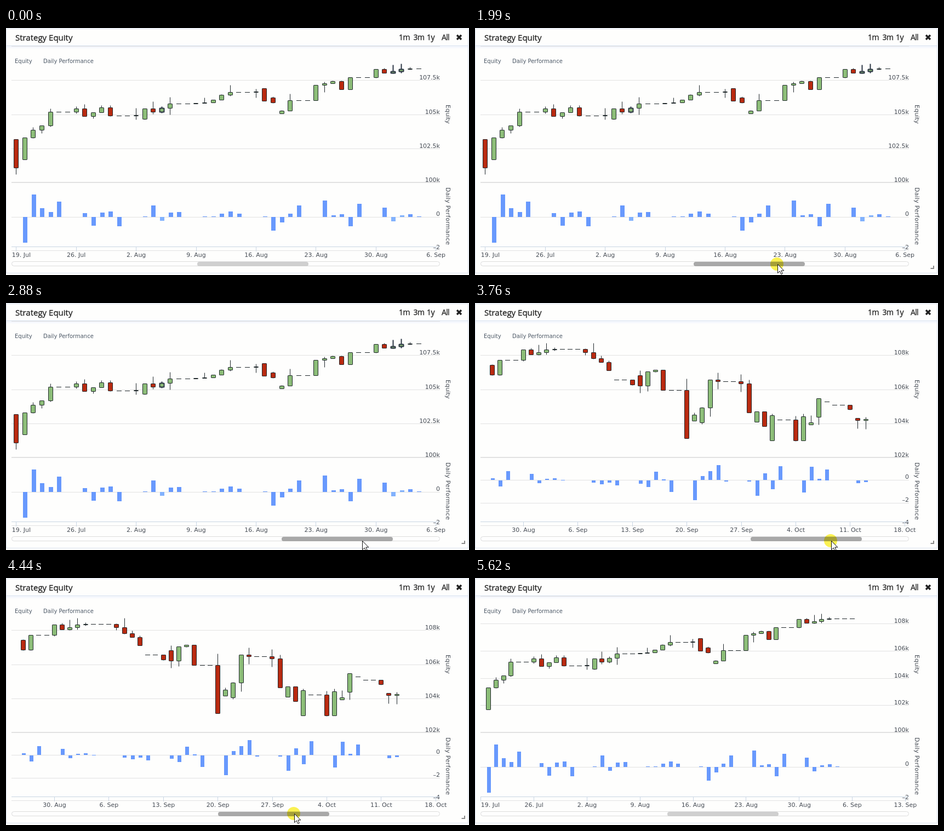
Animation of 845 by 451 pixels, one loop 6160 ms. Source, as an HTML page:

```html
<!DOCTYPE html>
<html lang="en">
<head>
<meta charset="utf-8">
<title>Strategy Equity</title>
<style>
  html, body { margin: 0; width: 100%; height: 100%; overflow: hidden; background: #fefefd; }
  svg { display: block; width: 845px; height: 451px; }
  text { font-family: "DejaVu Sans", sans-serif; font-size: 11px; fill: #454b54; }
  .head { font-family: "Open Sans", sans-serif; font-size: 15px; fill: #222; stroke: #222; stroke-width: .3; }
  .btn { font-size: 14px; text-anchor: middle; letter-spacing: -.6px; }
  .key { font-size: 10px; fill: #4c5866; }
  .end { text-anchor: end; }
  .mid { text-anchor: middle; }
  .grid { stroke: #e2e2e2; }
  .axis { stroke: #c9d6e4; }
  .ink { stroke: #20282c; }
  .bold { stroke: #2c3644; stroke-width: 2; }
</style>
</head>
<body>
<svg id="stage" viewBox="0 0 845 451"></svg>
<script>
const LOOP = 6160;
const stage = document.getElementById('stage');

function el(tag, attrs, parent = stage, text) {
  const node = document.createElementNS('http://www.w3.org/2000/svg', tag);
  for (const k in attrs) node.setAttribute(k, attrs[k]);
  if (text !== undefined) node.textContent = text;
  parent.appendChild(node);
  return node;
}
const line = (x1, y1, x2, y2, cls, parent) => el('line', { x1, y1, x2, y2, class: cls }, parent);
const label = (x, y, text, cls, parent) => el('text', { x, y, class: cls }, parent, text);
const snap = v => Math.round(v) + .5;

let seed = 7;
const random = () => (seed = seed * 16807 % 2147483647) / 2147483647;

// Weekday closes above 100k, in tens, and the days that open with a jump.
const START = 318;
const closes = [
  109, 330, 386, 418, 519, 543, 487, 515, 551, 491, 495, 543, 519, 547, 579,
  583, 587, 607, 643, 663, 667, 599, 587, 527, 603, 716, 728, 744, 684, 772,
  832, 804, 816, 832, 836, 836, 817, 781, 759, 711, 627, 621, 704, 714, 595,
  312, 451, 492, 656, 646, 634, 463, 470, 383, 447, 300, 441, 406, 547, 528,
  483, 418, 425];
const jumps = { 1: 60, 15: -28, 29: 24, 30: 24, 31: -80, 54: -55, 57: 55, 64: 103, 65: -45,
  72: -55, 74: -83, 75: -25, 79: -48, 80: 32, 81: -19, 82: -20, 85: -51 };

// Each day opens at the last close; weekends stay flat; daily results follow one day later.
const candles = [], results = [];
let last = START;
for (let day = 0, n = 0; n < closes.length; day++) {
  const open = last + (jumps[day] || 0);
  const close = day % 7 < 5 ? closes[n++] : open;
  const wick = () => close === open ? 0 : 70 * random() ** 4;
  candles[day] = [open, close, Math.max(open, close) + wick(), Math.min(open, close) - wick()]
    .map(v => 100 + v / 100);
  results[day + 1] = 2 * Math.tanh((close - open) / (10000 + open) * 50);
  last = close;
}

function dateText(day) {
  const d = new Date(Date.UTC(2010, 6, 19 + day));
  return d.getUTCDate() + '. ' + ['Jul', 'Aug', 'Sep', 'Oct'][d.getUTCMonth() - 6];
}

const views = [
  { x0: 18.8, step: 15.63, from: 0, to: 47, mondays: [0, 49], base: 100, gap: 2.5, scale: 24.87,
    zero: 345, unit: 30.75, bar: 8, bold: [17, 44, 45] },
  { x0: -507.9, step: 14.2, from: 38, to: 86, mondays: [42, 91], base: 102, gap: 2, scale: 31.12,
    zero: 323.5, unit: 20.75, bar: 7, bold: [] },
  { x0: 10.8, step: 13.83, from: 1, to: 49, mondays: [0, 56], base: 100, gap: 2, scale: 24.87,
    zero: 345, unit: 30.75, bar: 7, bold: [] }
];

function drawCandle(g, x, [o, c, h, l], cls) {
  const left = Math.floor(x - 4.2) + .5, mid = left + 4;
  const top = Math.min(o, c), bottom = Math.max(o, c);
  if (h < top) line(mid, h, mid, top, cls, g);
  if (l > bottom) line(mid, bottom, mid, l, cls, g);
  if (o === c) return line(left - .5, o, left + 8.5, o, 'ink', g);
  el('rect', { x: left, y: top, width: 8, height: bottom - top, rx: .6,
    class: cls, fill: c > o ? '#b92a10' : '#8cbd78' }, g);
}

function drawView(v) {
  const g = el('g', {});
  const X = d => v.x0 + d * v.step;
  const Y = k => snap(282 - (k - v.base) * v.scale);
  if (v.base === 100) line(10, 33.5, 792, 33.5, 'grid', g);
  el('rect', { x: 10, y: 281, width: 782, height: 2, fill: '#e2e2e2' }, g);
  for (let k = v.base; k <= 108; k += v.gap) {
    if (k > v.base) line(10, Y(k), 792, Y(k), 'grid', g);
    label(792, Y(k) - 1.5, k + 'k', 'end', g);
  }
  for (let p = 0; v.zero + p * v.unit < 410; p += 2) {
    const y = Math.floor(v.zero + p * v.unit) + .5;
    line(10, y, 792, y, 'grid', g);
    label(792, y - 2.5, p ? '–' + p : 0, 'end', g);
  }
  line(10, 399.5, 792, 399.5, 'axis', g);
  for (let d = v.mondays[0]; d <= v.mondays[1]; d += 7) {
    const x = snap(X(d) - .5);
    line(x, 400, x, 408, 'axis', g);
    label(Math.max(X(d), 28), 418, dateText(d), 'mid', g);
  }
  for (let d = v.from; d <= v.to; d++) {
    const x = X(d), lit = v.bold.includes(d);
    if (results[d]) {
      const h = results[d] * v.unit;
      el('rect', { x: Math.floor(x - v.bar / 2 + 1), y: Math.round(v.zero - Math.max(h, 0)), width: v.bar,
        height: Math.max(1, Math.round(Math.abs(h))), fill: lit ? '#82b2fd' : '#6899fd' }, g);
    }
    drawCandle(g, x, candles[d].map(Y), lit ? 'bold' : 'ink');
  }
  return g;
}

// Panel
el('rect', { x: .5, y: 1.5, width: 843, height: 446, fill: '#fefefd', stroke: '#d9e1ee' });
el('rect', { x: 1, y: 32, width: 842, height: 1, fill: '#d5dfef' });
el('rect', { x: 1, y: 33, width: 842, height: 4, fill: '#f6f8fd' });
label(17, 23, 'Strategy Equity', 'head');
[[727, '1m'], [753.5, '3m'], [775, '1y'], [802, 'All']]
  .forEach(([x, s]) => label(x, 22, s, 'head btn'));
el('path', { d: 'M823 13L831 21M831 13L823 21', stroke: '#222', 'stroke-width': 3.4 });
label(16, 64, 'Equity', 'key');
label(68, 64, 'Daily Performance', 'key');

const charts = views.map(drawView);
const sideText = (y, text, spacing) => el('text',
  { transform: `translate(803 ${y}) rotate(90)`, 'letter-spacing': spacing }, stage, text);
sideText(140, 'Equity', 0);
sideText(291, 'Daily Performance', .25);

el('rect', { x: 10.5, y: 426.5, width: 781, height: 8, rx: 4, fill: '#fefefe', stroke: '#dcdcdc' });
const thumb = el('rect', { y: 427, width: 203, height: 8, rx: 4 });
const grip = el('path', { d: 'M837 434V439H831.5', fill: 'none', stroke: '#8a8a8a', 'stroke-width': 2 });
const halo = el('circle', { r: 12, fill: '#fbf252', style: 'mix-blend-mode:multiply' });
const arrow = el('path', { d: 'M1.5 .5V16.5L5.2 13L7.8 18.6L10.3 17.5L7.8 12H12.8Z', fill: '#fff', stroke: '#111' });

// Motion: [time, value]
const thumbX = [[1620, 349], [2230, 431], [2420, 462], [2750, 503], [3850, 503],
  [4370, 402], [4440, 387], [4640, 354], [4740, 351]];
const handY = [[730, 450], [1060, 428], [1620, 428], [2230, 433], [2420, 434], [3830, 434],
  [4440, 430], [5440, 430], [5620, 452]];

function at(keys, t) {
  const i = keys.findIndex(k => k[0] > t);
  if (i < 0) return keys[keys.length - 1][1];
  if (i === 0) return keys[0][1];
  const [t0, a] = keys[i - 1], [t1, b] = keys[i];
  return a + (b - a) * (t - t0) / (t1 - t0);
}
const within = (t, a, b) => t >= a && t < b;
const show = (node, on) => node.setAttribute('visibility', on ? 'visible' : 'hidden');

function render(t) {
  const current = within(t, 2930, 4880) ? 1 : t >= 4880 ? 2 : 0;
  charts.forEach((c, i) => show(c, i === current));
  thumb.setAttribute('x', Math.round(at(thumbX, t)));
  thumb.setAttribute('fill', within(t, 910, 5520) ? '#a8a8a8' : '#cfcfcf');
  show(grip, within(t, 780, 5600));
  show(arrow, within(t, 730, 5620));
  show(halo, within(t, 1410, 2880) || within(t, 3760, 4830));
  // The thumb trails the hand by about one step.
  const place = `translate(${Math.round(at(thumbX, t + 45) + 146)} ${Math.round(at(handY, t))})`;
  halo.setAttribute('transform', place);
  arrow.setAttribute('transform', place);
}

const began = performance.now();
function tick() {
  render((performance.now() - began) % LOOP);
  requestAnimationFrame(tick);
}
tick();
</script>
</body>
</html>
```
